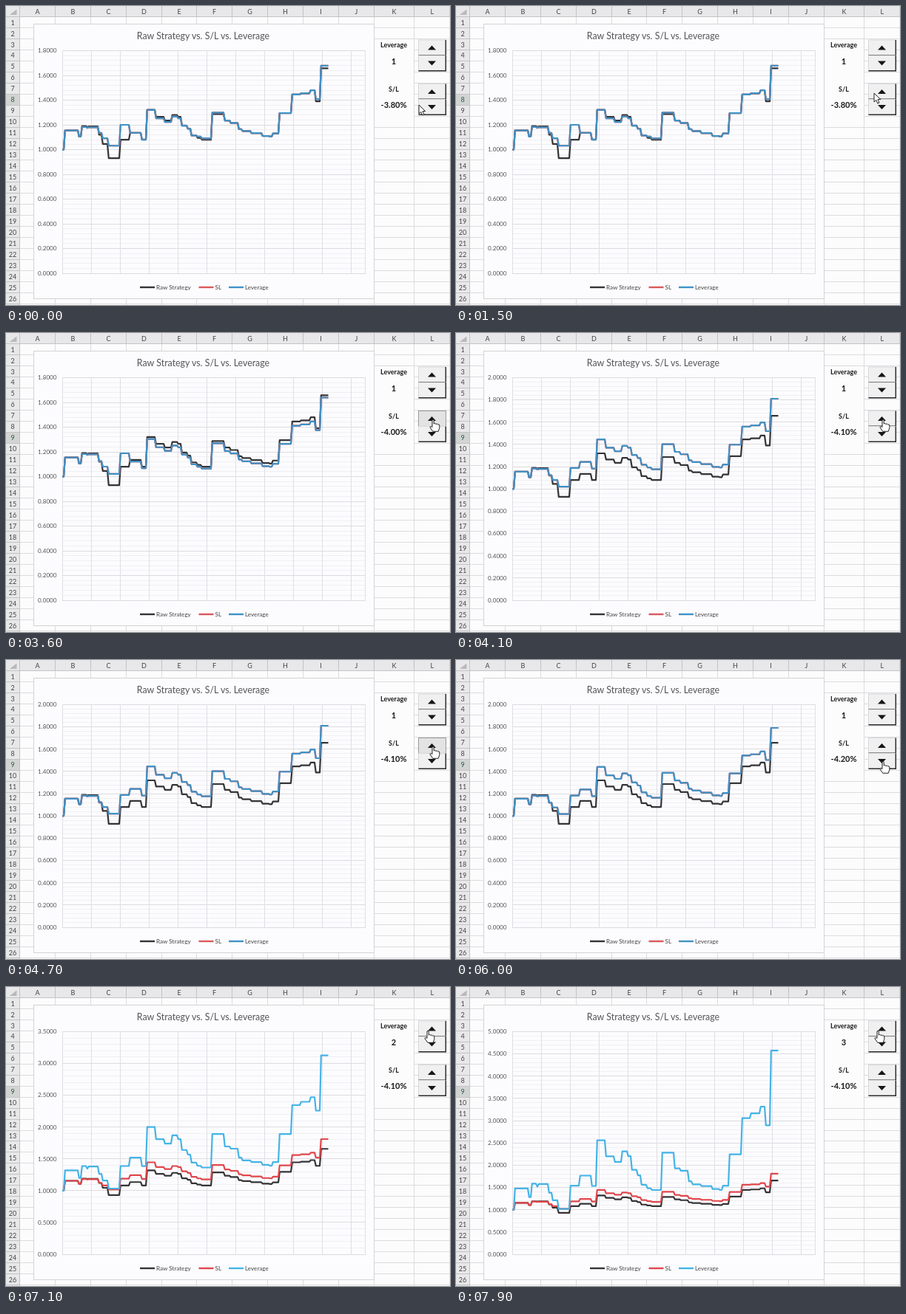
Recreate the animation shown at these times as an HTML page. Size 600 by 405 pixels, loop 8000 ms.

```html
<!DOCTYPE html>
<html lang="en">
<head>
<meta charset="utf-8">
<title>Stop-loss and leverage chart</title>
<style>
html, body { margin: 0; width: 100%; height: 100%; overflow: hidden; background: #fcfcfd; }
svg { display: block; width: 600px; height: 405px; font-family: Lato, "Open Sans", sans-serif; }
</style>
</head>
<body>
<svg id="stage" viewBox="0 0 600 405"></svg>
<script>
const LOOP = 8000;
const PLOT = { left: 76.5, right: 486, top: 60.5, bottom: 362 };
const COLUMNS = [18.5, 66.5, 114.5, 162.5, 210.5, 257.5, 305.5, 353.5, 401.5, 449.5, 497.5, 551.5, 600];
const ROW = 14.96;

// x of each step, raw strategy level, level at double leverage
const LEVELS = [
  [76, 1, 1], [79, 1.155, 1.318], [98, 1.105, 1.2], [102, 1.19, 1.387], [109, 1.183, 1.347],
  [111, 1.187, 1.38], [125, 1.12, 1.265], [130, 1.045, 1.16], [138, .93, 1.033], [154, 1.08, 1.387],
  [167, 1.135, 1.52], [183, 1.08, 1.385], [190, 1.32, 2], [202, 1.265, 1.81], [214, 1.235, 1.74],
  [224, 1.28, 1.87], [232, 1.265, 1.81], [237, 1.195, 1.64], [245, 1.17, 1.567], [250, 1.115, 1.44],
  [258, 1.095, 1.39], [264, 1.08, 1.364], [278, 1.287, 1.89], [295, 1.235, 1.695], [303, 1.215, 1.66],
  [314, 1.165, 1.52], [319, 1.15, 1.475], [331, 1.133, 1.45], [346, 1.11, 1.405], [356, 1.105, 1.39],
  [360, 1.13, 1.45], [369, 1.295, 1.89], [386, 1.445, 2.345], [398, 1.455, 2.397], [411, 1.48, 2.47],
  [418, 1.39, 2.258], [425, 1.657, 3.128]
];
// stop-loss level relative to raw, from a given x on
const RATIOS = [[0, 1], [102, .994], [125, 1.004], [130, 1.034], [138, 1.098], [154, 1.1], [167, .988],
  [202, .978], [237, .986], [295, .977], [418, .989]];
// per stop-loss setting: factor from x = 125, 167 and 258
const SETTINGS = {
  "-3.80%": [1.01, 1.013, 1.024], "-3.90%": [1.005, 1.006, 1.012], "-4.00%": [1, 1, 1],
  "-4.10%": [1, 1.108, 1.105], "-4.20%": [.996, 1.104, 1.093]
};
const BUTTONS = { levUp: [46, 21], levDown: [67, 21], slUp: [105.5, 21], slDown: [126.5, 21] };

// changes to the state over time
const STEPS = [
  [0, { sl: "-3.80%", lev: 1, max: 1.8, unit: .2, row: 8, press: "", hand: 0, at: [558, 134] }],
  [100, { at: [559, 138] }], [200, { at: [561, 142] }], [300, { at: [562, 145] }],
  [1500, { at: [565, 118] }], [1600, { hand: 1, at: [573, 118] }],
  [1700, { row: 9, at: [576, 117] }], [1800, { at: [577, 117] }],
  [2300, { press: "slUp" }], [2600, { press: "" }], [2700, { sl: "-3.90%" }],
  [2900, { press: "slUp" }], [3300, { press: "" }], [3400, { sl: "-4.00%" }],
  [3600, { press: "slUp" }], [4000, { press: "" }], [4100, { sl: "-4.10%", max: 2 }],
  [4700, { press: "slUp" }], [5000, { press: "" }], [5100, { sl: "-4.20%" }],
  [5300, { at: [577, 124] }], [5400, { at: [577, 133] }], [5500, { at: [577, 137] }],
  [5700, { press: "slDown" }], [6000, { press: "" }], [6100, { sl: "-4.10%" }],
  [6200, { at: [577, 128] }], [6300, { at: [576, 106] }], [6400, { at: [573, 82] }],
  [6500, { at: [571, 66] }], [6600, { at: [570, 59] }],
  [6700, { press: "levUp" }], [7000, { press: "" }], [7100, { lev: 2, max: 3.5, unit: .5 }],
  [7500, { press: "levUp" }], [7700, { press: "" }], [7800, { lev: 3, max: 5 }]
];

const stage = document.getElementById("stage");
function add(tag, attrs, parent = stage) {
  const node = document.createElementNS("http://www.w3.org/2000/svg", tag);
  for (const key in attrs) node.setAttribute(key, attrs[key]);
  return parent.appendChild(node);
}
const set = (node, attrs) => { for (const key in attrs) node.setAttribute(key, attrs[key]); };
const rect = (x, y, width, height, fill, more = {}, parent) => add("rect", { x, y, width, height, fill, ...more }, parent);
const stroke = (d, color, width = 1, parent) => add("path", { d, stroke: color, "stroke-width": width, fill: "none" }, parent);
function text(x, y, size, value, more = {}, parent) {
  const node = add("text", { x, y, "font-size": size, fill: "#444", "text-anchor": "middle", ...more }, parent);
  node.textContent = value;
  return node;
}
const snap = y => Math.round(y) + .5;

// worksheet
let lines = "";
for (const x of COLUMNS.slice(1)) lines += `M${x} 15V405`;
for (let i = 1; i <= 26; i++) lines += `M19 ${snap(14 + ROW * i)}H600`;
stroke(lines, "#dcdcdf");
rect(498, 45, 53, 105, "#fcfcfd");
rect(0, 0, 600, 14.5, "#e8e8ea");
rect(0, 0, 18.5, 405, "#e8e8ea");
const rowMark = rect(0, 0, 18.5, 14.5, "#d2d4d3");
let heads = "M0 14.5H600M18.5 0V405";
for (const x of COLUMNS.slice(1)) heads += `M${x} 0V14`;
for (let i = 1; i <= 26; i++) heads += `M0 ${snap(14 + ROW * i)}H18`;
stroke(heads, "#c3c3c6");
add("path", { d: "M14.5 4.5V12H5Z", fill: "#b9b9bc" });
[..."ABCDEFGHIJKL"].forEach((letter, i) => text((COLUMNS[i] + COLUMNS[i + 1]) / 2, 11, 9, letter));
const rowLabels = Array.from({ length: 26 }, (_, i) => text(9, 25.6 + ROW * i, 9, i + 1));

// chart frame
rect(37.5, 24.5, 460, 372, "#fcfcff", { stroke: "#d3d3d6" });
text(266.5, 45, 12.4, "Raw Strategy vs. S/L vs. Leverage", { fill: "#555" });
const minor = stroke("", "#f0f0f2");
const major = stroke("", "#dcdce0");
let uprights = "";
for (let x = PLOT.left; x < PLOT.right; x += 39) uprights += `M${x} 60V362`;
stroke(uprights + "M485.5 60V362", "#dfdfe4");
const axisLabels = Array.from({ length: 11 }, () => text(68.5, 0, 8.1, "", { "text-anchor": "end", fill: "#555" }));
const curve = color => add("path", { stroke: color, "stroke-width": 2.2, fill: "none", "stroke-linejoin": "round" });
const rawCurve = curve("#343436"), slCurve = curve("#e0474c"), levCurve = curve("#3f92c5");
const legend = (x, label, color) => {
  text(x + 22, 384, 8.1, label, { "text-anchor": "start" });
  return stroke(`M${x} 381H${x + 20}`, color, 2.4);
};
legend(181, "Raw Strategy", "#343436");
const slKey = legend(260.5, "SL", "#d9595c");
const levKey = legend(301, "Leverage", "#3f92c5");

// controls
const bold = { "font-weight": 700, fill: "#1c1c1c" };
text(524, 56, 9, "Leverage", bold);
text(524, 116, 9, "S/L", bold);
const levText = text(524, 79, 11, "", bold);
const slText = text(524, 138, 11, "", bold);
const buttons = Object.entries(BUTTONS).map(([name, [y, h]]) => {
  const group = add("g", {});
  const face = rect(557.5, y, 37, h, "#f0f0f1", { "stroke-width": 1 }, group);
  const edge = stroke(`M557.5 ${y + h - .3}H594.3V${y}`, "#2c2c2c", 1.5, group);
  const c = y + h / 2, tip = name.endsWith("Up") ? -3 : 3;
  add("path", { d: `M570 ${c - tip}H581L575.5 ${c + tip}Z`, fill: "#161616" }, group);
  return { name, face, edge };
});

// pointers
const pointer = d => add("path", { d, fill: "#fff", stroke: "#222", "stroke-width": 1, "stroke-linejoin": "round" });
const arrow = pointer("M0 0V12L2.8 9.4L4.8 14L7 13L5 8.6H8.8Z");
const hand = pointer("M-1 1Q0 -.8 1.2 1V6Q2.6 4.8 4 6.4Q5.4 5.4 6.5 7Q8.2 6 8.8 8V11.5L7.2 16.3H-.2L-4 10.8Q-4 8.6 -1 10.4Z");

const lastFrom = (table, x) => table.filter(([from]) => from <= x).pop()[1];
const yOf = (value, max) => PLOT.bottom - value / max * (PLOT.bottom - PLOT.top);

function stopLoss(setting) {
  const [early, mid, late] = SETTINGS[setting];
  const factors = [[0, 1], [125, early], [167, mid], [258, late]];
  return LEVELS.map(([x, raw]) => raw * lastFrom(RATIOS, x) * lastFrom(factors, x));
}
function leveraged(lev, base) {
  if (lev === 1) return base;
  const doubled = LEVELS.map(level => level[2]);
  if (lev === 2) return doubled;
  let value = 1;
  return doubled.map((level, i) => {
    if (i) value *= 1 + 1.5 * (level / doubled[i - 1] - 1);
    return value * (1 + .0018 * i);
  });
}
function stepPath(values, max) {
  let d = "";
  values.forEach((value, i) => {
    const x = LEVELS[i][0], y = yOf(value, max).toFixed(2);
    d += i ? `H${x - 1}L${x + .8} ${y}` : `M${x} ${y}`;
  });
  return d + "H435.5";
}

function drawChart({ sl, lev, max, unit }) {
  const count = Math.round(max / unit);
  let fine = "", coarse = "";
  for (let i = 0; i <= count * 5; i++) {
    const line = `M76 ${snap(yOf(i * unit / 5, max) - .5)}H486`;
    if (i % 5) fine += line; else coarse += line;
  }
  set(minor, { d: fine });
  set(major, { d: coarse });
  axisLabels.forEach((label, i) => {
    label.textContent = i <= count ? (i * unit).toFixed(4) : "";
    label.setAttribute("y", yOf(i * unit, max) + 2.8);
  });
  const stopped = stopLoss(sl), blue = lev > 1 ? "#45b3e6" : "#3f92c5";
  set(rawCurve, { d: stepPath(LEVELS.map(level => level[1]), max) });
  set(slCurve, { d: stepPath(stopped, max) });
  set(levCurve, { d: stepPath(leveraged(lev, stopped), max), stroke: blue });
  set(levKey, { stroke: blue });
  set(slKey, { stroke: lev > 1 ? "#e0474c" : "#d9595c" });
}

function draw(state) {
  drawChart(state);
  levText.textContent = state.lev;
  slText.textContent = state.sl;
  set(rowMark, { y: 15 + ROW * (state.row - 1) });
  rowLabels.forEach((label, i) => set(label, { fill: i + 1 === state.row ? "#2c5a43" : "#444" }));
  for (const { name, face, edge } of buttons) {
    const down = name === state.press;
    set(face, { fill: down ? "#e3e3e4" : "#f0f0f1", stroke: down ? "#9a9a9c" : "#d8d8da" });
    set(edge, { visibility: down ? "hidden" : "visible" });
  }
  const transform = `translate(${state.at})`;
  set(arrow, { transform, visibility: state.hand ? "hidden" : "visible" });
  set(hand, { transform, visibility: state.hand ? "visible" : "hidden" });
}

const start = performance.now();
let shown = -1;
function tick() {
  const time = Math.max(0, performance.now() - start) % LOOP;
  const past = STEPS.filter(([at]) => at <= time);
  if (past.length !== shown) {
    shown = past.length;
    draw(Object.assign({}, ...past.map(([, change]) => change)));
  }
  requestAnimationFrame(tick);
}
tick();
</script>
</body>
</html>
```
